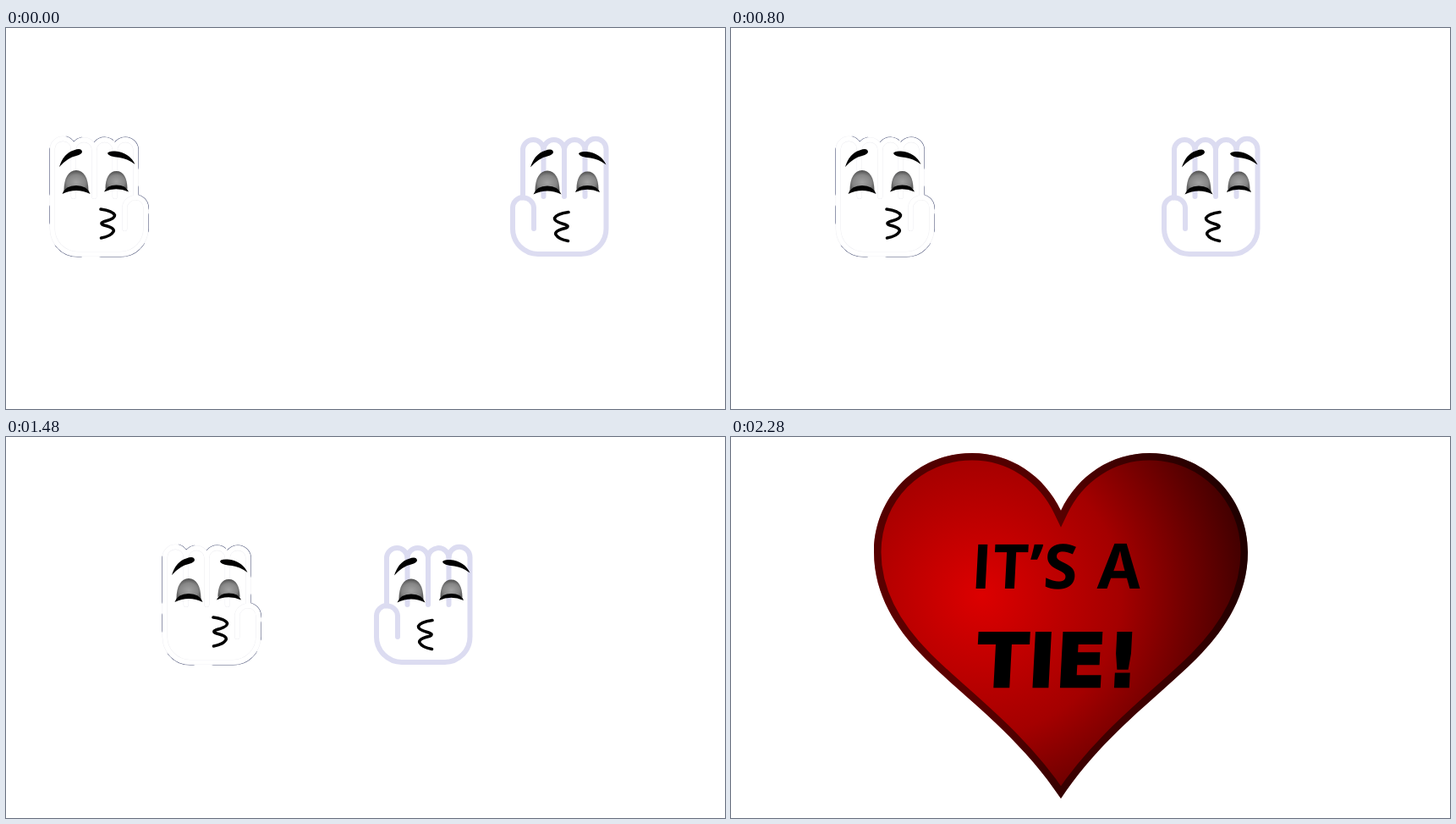
These frames come from a looping animation (850 px wide and 450 px high, 4.84 s). An HTML page:

```html
<!DOCTYPE html>
<html lang="en">
<head>
<meta charset="utf-8">
<title>It's a tie</title>
<style>
  html, body { margin: 0; width: 100%; height: 100%; overflow: hidden; background: #fff; }
  svg { display: block; width: 850px; height: 450px; }
  .line { fill: none; stroke-linecap: round; stroke-linejoin: round; }
</style>
</head>
<body>
<svg viewBox="0 0 850 450">
  <defs>
    <radialGradient id="lid" cy=".6" r=".62">
      <stop stop-color="#a2a2a2"/>
      <stop offset=".6" stop-color="#868686"/>
      <stop offset="1" stop-color="#484848"/>
    </radialGradient>
    <radialGradient id="red" gradientUnits="userSpaceOnUse" cx="296" cy="186" r="330">
      <stop stop-color="#dc0000"/>
      <stop offset=".5" stop-color="#a40000"/>
      <stop offset="1" stop-color="#380000"/>
    </radialGradient>

    <path id="palm" d="M3 212A12.5 12.5 0 0 1 15 200V143a12.3 12 0 0 1 24.5 0a12.3 12 0 0 1 24.5 0a12.3 12 0 0 1 24.5 0a12.3 12 0 0 1 25 0V237a30 30 0 0 1-30 30H33a30 30 0 0 1-30-30Z"/>
    <g id="lines">
      <use href="#palm"/>
      <path d="M39.5 143V199M64 143V199M88.5 143V199M15 200.5A12.5 12.5 0 0 1 28 212V237"/>
    </g>

    <g id="face">
      <path d="M63 164Q68 148 80 144.500Q89 141 90 146Q90 149 83 151Q73 153 63 164Z"/>
      <path d="M120 148Q121 145 129 145.500Q146 147 152.500 161Q143 154 134 153Q121 152 120 148Z"/>
      <path fill="url(#lid)" d="M68.500 192C68.500 177 74 168 83 168S97.500 177 97.500 192Q83 184 68.500 192Z"/>
      <path d="M66.500 196Q70 186 83 186T99.500 196Q83 188 66.500 196Z"/>
      <path fill="url(#lid)" d="M117.500 190C117.500 177 122 169 130.500 169S143.500 177 143.500 190Q130 183 117.500 190Z"/>
      <path d="M116 193.500Q119 185.500 130.500 185.500T145 193.500Q130 187 116 193.500Z"/>
    </g>
    <path id="mouth" class="line" stroke="#000" stroke-width="3.600" d="M112 214Q126 216 128.500 221Q129 225 118 228Q109 230.500 116 233Q129 236 127 240.500Q124 246 112.500 248"/>

    <path id="shape" d="M390 87C370 45 330 19 285 19C220 19 169 71 169 136C169 190 200 232 230 262C275 307 340 352 390 427C440 352 505 307 550 262C580 232 611 190 611 136C611 71 560 19 495 19C450 19 410 45 390 87Z"/>
    <clipPath id="inside"><use href="#shape"/></clipPath>
  </defs>

  <g id="hands">
    <g id="left">
      <g transform="translate(168.300) scale(-1 1)">
        <use href="#palm" class="line" stroke="#4c5478" stroke-width="7.200" stroke-dasharray="30 24 52 16 18 28"/>
        <use href="#palm" fill="#fff"/>
        <use href="#lines" class="line" stroke="#e9e9ee" stroke-width="6.200"/>
        <use href="#lines" class="line" stroke="#fff" stroke-width="5.500"/>
      </g>
      <use href="#face"/>
      <use href="#mouth"/>
    </g>
    <g id="right">
      <g transform="translate(596)">
        <use href="#palm" fill="#fff"/>
        <use href="#lines" class="line" stroke="#dcdcf1" stroke-width="6"/>
      </g>
      <use href="#face" x="557" y=".5"/>
      <use href="#mouth" transform="translate(777 3.500) scale(-1 1)"/>
    </g>
  </g>

  <g id="heart" display="none">
    <use href="#shape" fill="url(#red)"/>
    <use href="#shape" fill="none" stroke="#000" stroke-opacity=".5" stroke-width="17" stroke-miterlimit="8" clip-path="url(#inside)"/>
    <g font-size="73" font-weight="700">
      <text transform="translate(283 179) skewX(-3)" font-family="'Open Sans', sans-serif" letter-spacing="1">IT’S</text>
      <text transform="translate(458 179) skewX(-3)" font-family="Inter, sans-serif" text-anchor="middle">A</text>
    </g>
    <text transform="translate(290 295) skewX(-3)" font-family="'DejaVu Sans', sans-serif" font-weight="700" font-size="87.500" stroke="#000" stroke-width="2.500">TIE!</text>
  </g>
</svg>
<script>
  const LOOP = 4840, STEP = 40, MEET = 57;
  const [hands, left, right, heart] =
    ['hands', 'left', 'right', 'heart'].map(id => document.getElementById(id));

  const show = (el, on) => el.setAttribute('display', on ? 'inline' : 'none');
  const move = (el, x, y) =>
    el.setAttribute('transform', `translate(${Math.round(x)} ${Math.round(y)})`);

  function draw() {
    const n = Math.floor(performance.now() % LOOP / STEP);
    const met = n >= MEET;
    show(hands, !met);
    show(heart, met);
    if (!met) {
      move(left, 3.59 * n, -n / 50);
      move(right, -4.35 * n, -n / 40);
    }
    requestAnimationFrame(draw);
  }
  draw();
</script>
</body>
</html>
```
